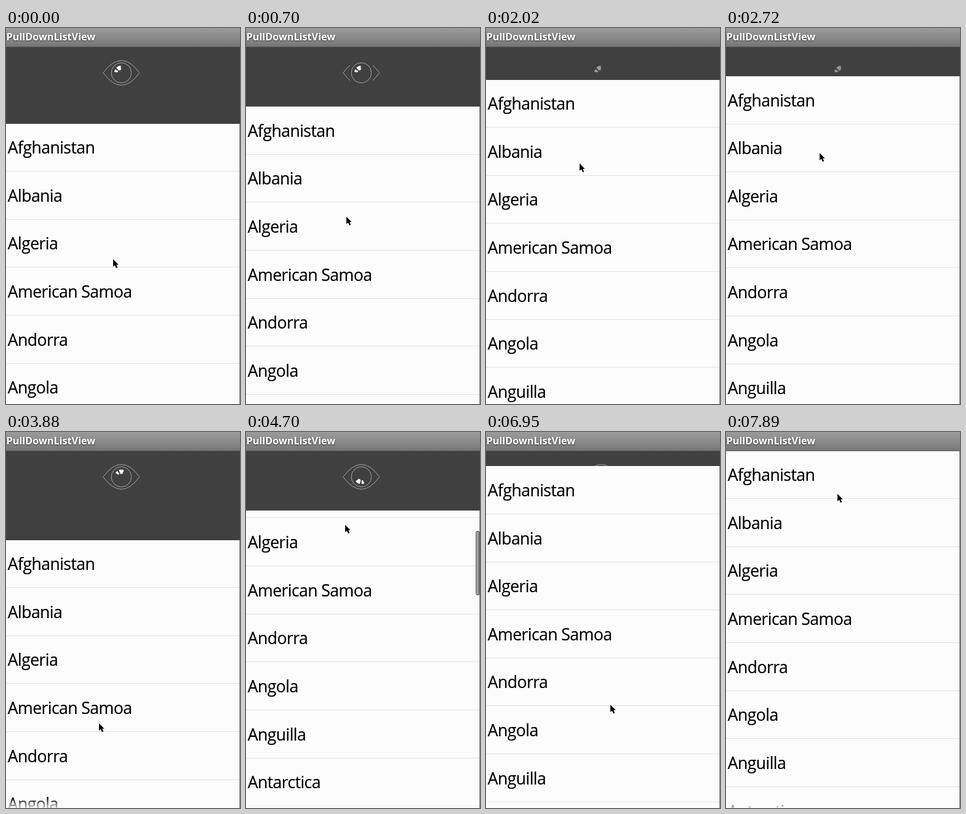
An HTML page that plays this animation: 380x608 px, repeating every 8000 ms.

```html
<!DOCTYPE html>
<html lang="en">
<head>
<meta charset="utf-8">
<title>PullDownListView</title>
<style>
  html, body { margin: 0; width: 100%; height: 100%; overflow: hidden; background: #404040; }
  svg { display: block; width: 380px; height: 608px; }
  text { font-family: "Open Sans", "Noto Sans", sans-serif; }
  .row { font-size: 26.6px; letter-spacing: -.58px; fill: #000; stroke: #000; stroke-width: .2px; }
  .title { font-size: 16.2px; font-weight: 700; fill: #fff; filter: drop-shadow(0 1px 1px #0009); }
  .line { fill: none; stroke: #b8b8b8; stroke-width: .85; }
</style>
</head>
<body>
<svg viewBox="0 0 380 608">
  <defs>
    <linearGradient id="bar" x2="0" y2="1">
      <stop stop-color="#9b9b9b"/><stop offset=".5" stop-color="#8b8b8b"/><stop offset="1" stop-color="#757575"/>
    </linearGradient>
    <linearGradient id="haze" x2="0" y2="1">
      <stop stop-color="#e6dcc8"/><stop offset=".5" stop-color="#efeae0" stop-opacity=".8"/>
      <stop offset="1" stop-color="#fcfcfc" stop-opacity="0"/>
    </linearGradient>
    <linearGradient id="edge" x2="0" y2="1">
      <stop stop-color="#fcfcfc" stop-opacity="0"/><stop offset="1" stop-color="#fcfcfc" stop-opacity=".8"/>
    </linearGradient>
    <linearGradient id="grip">
      <stop stop-color="#b4b4b4"/><stop offset="1" stop-color="#848484"/>
    </linearGradient>
    <clipPath id="clip"><rect id="clipBox" width="380" height="608"/></clipPath>
  </defs>
  <rect width="380" height="608" fill="#404040"/>
  <g transform="translate(187.3 72.5)">
    <path class="line lid" pathLength="1" d="M-29.5 0Q0-40 29.5 0"/>
    <path class="line lid" pathLength="1" d="M-29.5 0Q0 40 29.5 0"/>
    <circle id="iris" class="line" r="16.3" pathLength="1" transform="rotate(-90)"/>
    <path id="glint" fill="#fff"/>
  </g>
  <g clip-path="url(#clip)">
    <rect width="380" height="608" fill="#fcfcfc"/>
    <g id="rows"></g>
    <rect id="fade" y="592" width="380" height="16" fill="url(#edge)"/>
    <g id="glow">
      <rect width="380" height="38" fill="url(#haze)"/>
      <rect y=".7" width="380" height="2.2" fill="#f2ac38"/>
    </g>
    <rect x="379" width="1" height="608" fill="#777"/>
    <rect id="thumb" x="373.5" width="5.5" height="103" rx="2" fill="url(#grip)" stroke="#555"/>
  </g>
  <rect width="380" height="30.5" fill="url(#bar)"/>
  <text class="title" x=".6" y="20">PullDownListView</text>
  <path id="cursor" d="M0 0V12L2.8 9.6L5 14.2L7.2 13.2L5.2 8.8H8.6Z"/>
</svg>
<script>
const LOOP = 8000, TICK = 136, LAST = 58;
const BAR = 30, PITCH = 77.65, LOADING = 29;
const $ = id => document.getElementById(id);
const set = (el, attrs) => { for (const k in attrs) el.setAttribute(k, attrs[k]); };
const clamp = v => Math.max(0, Math.min(1, v));
const ramp = (k, a, b) => { const u = clamp((k - a) / (b - a)); return u * u * (3 - 2 * u); };

const names = ["Afghanistan", "Albania", "Algeria", "American Samoa", "Andorra", "Angola",
  "Anguilla", "Antarctica", "Antigua and Barbuda", "Argentina", "Armenia", "Aruba"];

const rows = names.map(name => {
  const make = tag => $("rows").appendChild(document.createElementNS("http://www.w3.org/2000/svg", tag));
  const label = make("text"), rule = make("rect");
  label.textContent = name;
  set(label, { class: "row", x: 2.8 });
  set(rule, { width: 380, height: 1, fill: "#e2e2e2" });
  return { label, rule };
});

// Annular sector, angles in degrees
function sector(mid, half, r1, r2) {
  const at = (r, a) => [r * Math.cos(a * Math.PI / 180), r * Math.sin(a * Math.PI / 180)].map(v => v.toFixed(2));
  return `M${at(r1, mid - half)}L${at(r2, mid - half)}A${r2} ${r2} 0 0 1 ${at(r2, mid + half)}L${at(r1, mid + half)}Z`;
}
$("glint").setAttribute("d", sector(0, 20, 5, 11.8) + sector(-46, 11, 6, 11.5));

// Turning points of the pointer: [tick, x, y]
const turns = [[0, 174, 374], [10, 152, 236], [20, 152, 202], [29, 151, 471], [31, 155, 292],
  [35, 161, 150], [44, 155, 297], [49, 205, 490], [58, 181, 100]];

function pointer(k) {
  const i = Math.max(1, turns.findIndex(p => p[0] >= k));
  const [k0, x0, y0] = turns[i - 1], [k1, x1, y1] = turns[i];
  const u = ramp(k, k0, k1);
  return [x0 + (x1 - x0) * u, y0 + (y1 - y0) * u].map(Math.round);
}

// A stroke that grows from both ends of a unit-length path
const grow = p => ({ "stroke-dasharray": `${p / 2} ${1 - p} ${p / 2} 0`, opacity: p ? 1 : 0 });

function draw(time) {
  const k = Math.min(LAST, Math.round(time / TICK));
  const loading = k >= LOADING;
  const top = 154 - 65.5 * ramp(k, 1, 10) - 11 * ramp(k, 10, 20) + 96.5 * ramp(k, 20, 29)
    - 48 * ramp(k, 29, 31) - 96 * ramp(k, 47, 53);
  const scroll = 142.3 * (ramp(k, 31, 35) - ramp(k, 35, 44));
  const pull = top - BAR;
  const spin = 245 + 26 * ramp(k, 20, 29) + 46 * Math.max(0, k - LOADING) ** .85;

  document.querySelectorAll(".lid").forEach(el => set(el, grow(loading ? 1 : clamp((pull - 78) / 42))));
  set($("iris"), grow(loading ? 1 : clamp((pull - 62) / 34)));
  set($("glint"), { transform: `rotate(${spin})`, opacity: loading ? 1 : clamp(pull / 108) });

  set($("clipBox"), { y: Math.round(top + .6) });
  rows.forEach(({ label, rule }, i) => {
    const y = top - scroll + i * PITCH;
    set(label, { y: Math.round(y + 49) });
    set(rule, { y: Math.round(y + 77) });
  });
  set($("fade"), { opacity: loading ? 1 : 0 });
  set($("glow"), { transform: `translate(0 ${top})`, opacity: ramp(k, 42, 44) - ramp(k, 44, 47) });
  set($("thumb"), { y: top + 2.5 + scroll * .225, opacity: ramp(k, 31, 32) - ramp(k, 45, 48) });
  set($("cursor"), { transform: `translate(${pointer(k)})` });
}

const start = performance.now();
function frame() {
  draw((performance.now() - start) % LOOP);
  requestAnimationFrame(frame);
}
frame();
</script>
</body>
</html>
```
